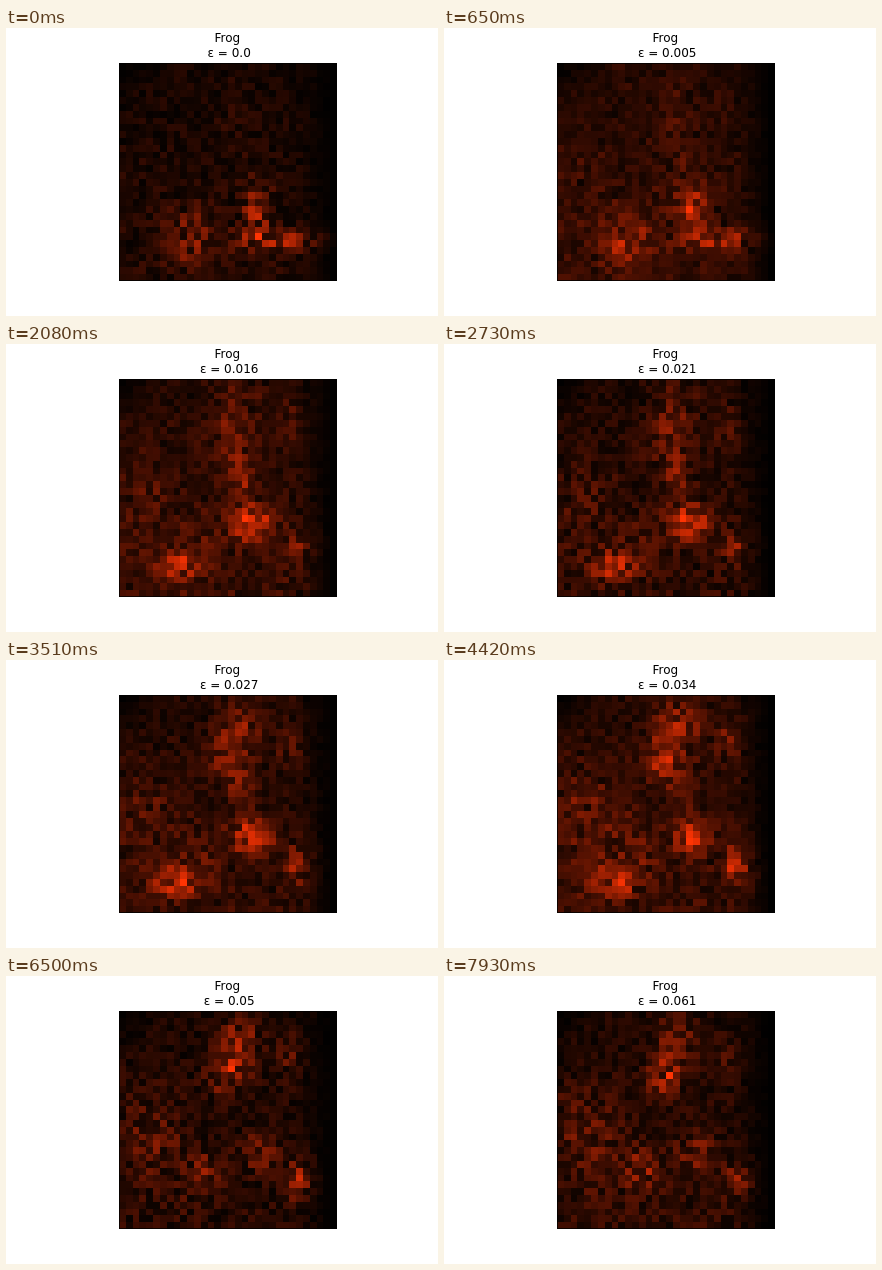
Write an HTML page with a canvas that moves like this. It is 432 by 288 pixels and loops after 8000 ms.

```html
<!DOCTYPE html>
<html lang="en">
<head>
<meta charset="utf-8">
<title>Saliency map</title>
<style>
  html, body { margin: 0; width: 432px; height: 288px; overflow: hidden; background: #fff; }
  canvas, svg { position: absolute; left: 0; top: 0; display: block; }
  text { font: 12px "DejaVu Sans", sans-serif; text-anchor: middle; fill: #000; }
</style>
</head>
<body>
<canvas id="map" width="432" height="288"></canvas>
<svg width="432" height="288">
  <text x="221.3" y="14">Frog</text>
  <text id="eps" x="223.2" y="29">ε = 0.0</text>
</svg>
<script>
const LOOP = 8000, STEP = 130, N = 32;
const LEFT = 113, TOP = 35, SIZE = 218;
const ctx = document.getElementById('map').getContext('2d');
const label = document.getElementById('eps');

// A soft spot that glows strongest at step `peak`; early spots fade faster.
const spot = (x, y, rx, ry, peak, power) => ({ x, y, rx, ry, peak, power, span: 6 + peak / 2 });

const spots = [
  spot(20, 21, 2, 4, 0, 0.45),
  spot(22, 25.5, 6, 1.5, 0, 0.5),
  spot(10, 25, 3.5, 4, 0, 0.35),
  spot(18.5, 20.5, 2.8, 2.8, 20, 0.35),
  spot(17.3, 14, 1.8, 3.5, 20, 0.28),
  spot(8, 27, 3.2, 2.2, 24, 0.45),
  spot(24.5, 6, 2, 3.5, 40, 0.2),
  spot(17, 4, 3, 4, 42, 0.42),
  spot(26, 24.3, 2, 2.8, 42, 0.45),
  spot(15.2, 9, 2.6, 2.6, 50, 0.5),
  spot(20, 20.3, 2.6, 2.4, 50, 0.32),
  spot(4, 18, 5.5, 7, 50, 0.2),
  spot(12, 23, 2.6, 3.2, 61, 0.28)
];

const bell = d => Math.exp(-d * d);

function noise(x, y, seed) {
  let h = Math.imul(x + 1, 374761393) ^ Math.imul(y + 1, 668265263) ^ Math.imul(seed + 1, 1442695041);
  h = Math.imul(h ^ (h >>> 15), 2246822519);
  h = Math.imul(h ^ (h >>> 13), 3266489917);
  return ((h ^ (h >>> 16)) >>> 0) / 4294967296;
}

// Cell noise that drifts to a new random level every ten steps.
function grain(x, y, step) {
  const seed = Math.floor(step / 10), a = noise(x, y, seed);
  return 0.2 + 1.6 * (a + (noise(x, y, seed + 1) - a) * (step % 10) / 10);
}

function heat(x, y, step) {
  const fade = Math.min(1, (N - 1 - x) / 6) * Math.min(1, (x + y + 1) / 8);
  let v = (0.11 + 0.06 * y / N) * fade;
  for (const s of spots) {
    v += s.power * bell((step - s.peak) / s.span) * bell((x - s.x) / s.rx) * bell((y - s.y) / s.ry);
  }
  return v * grain(x, y, step);
}

const edge = i => Math.round(i * SIZE / N);

function draw(step) {
  const values = Array.from({ length: N * N }, (_, i) => heat(i % N, Math.floor(i / N), step));
  const peak = Math.max(...values);

  ctx.fillStyle = '#fff';
  ctx.fillRect(0, 0, 432, 288);
  values.forEach((v, i) => {
    const x = i % N, y = Math.floor(i / N), level = v / peak;
    ctx.fillStyle = `rgb(${Math.round(255 * level)},${Math.round(52 * level)},${Math.round(3 * level)})`;
    ctx.fillRect(LEFT + edge(x), TOP + edge(y), edge(x + 1) - edge(x), edge(y + 1) - edge(y));
  });
  ctx.strokeStyle = 'rgba(0,0,0,.8)';
  ctx.lineWidth = 1;
  ctx.strokeRect(LEFT + 0.5, TOP + 0.5, SIZE - 1, SIZE - 1);
  label.textContent = 'ε = ' + (step ? step / 1000 : '0.0');
}

let shown = -1;
function tick() {
  const step = Math.floor(performance.now() % LOOP / STEP);
  if (step !== shown) draw(shown = step);
  requestAnimationFrame(tick);
}
tick();
</script>
</body>
</html>
```
